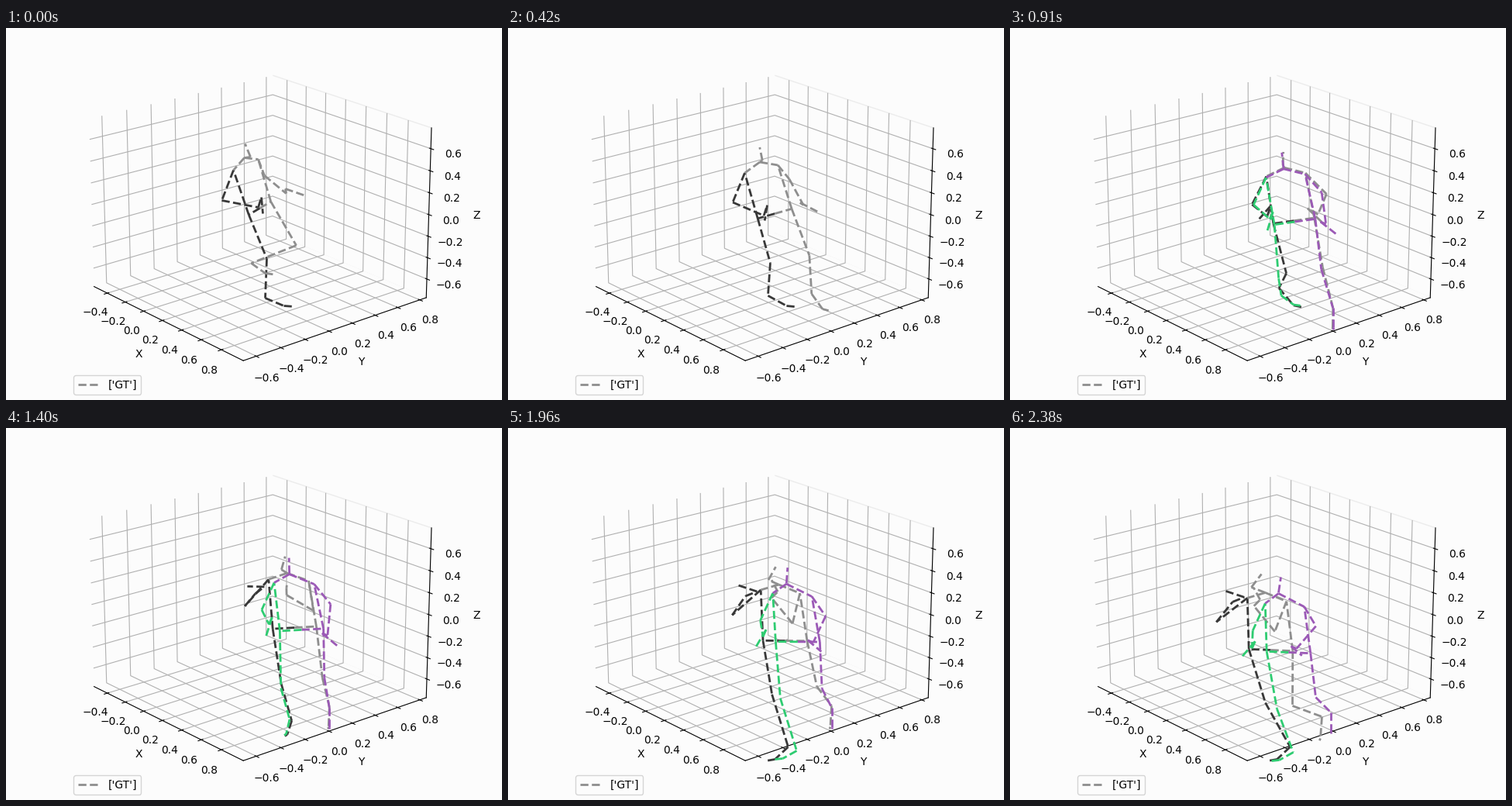
A matplotlib script that plays this animation: 640 by 480 pixels, repeating every 2450 ms.

```python
import numpy as np
import matplotlib.pyplot as plt
from matplotlib.animation import FuncAnimation
from matplotlib.lines import Line2D

W, H, DPI = 640, 480, 100
FRAMES, STEP = 35, 70
PRED_START = 10
TILT = np.sin(np.radians(20))  # foreshortening of level bars
BG = "#fcfcfc"
TRUE_COLORS = {"L": "#8e8e8e", "R": "#383838"}
PRED_COLORS = {"L": "#9b59b6", "R": "#2ecc71"}


def path(*keys):
    """Smooth motion through (time, x, y) keys without overshoot; holds at the ends."""
    keys = np.array(keys, float)
    time, points = keys[:, 0], keys[:, 1:]
    if len(keys) == 1:
        return lambda t: points[0]
    slope = np.diff(points, axis=0) / np.diff(time)[:, None]
    a, b = slope[:-1], slope[1:]
    same = a * b > 0
    mean = np.where(same, 2 * a * b / np.where(same, a + b, 1), 0)
    speed = np.vstack([slope[:1], mean, slope[-1:]])

    def at(t):
        t = np.clip(t, time[0], time[-1])
        i = min(np.searchsorted(time, t, "right"), len(time) - 1) - 1
        span = time[i + 1] - time[i]
        s = (t - time[i]) / span
        ease = s * s * (3 - 2 * s)
        return (points[i] * (1 - ease) + points[i + 1] * ease
                + span * s * (1 - s) * ((1 - s) * speed[i] - s * speed[i + 1]))
    return at


def half_bar(width, degrees):
    a = np.radians(degrees)
    return width / 2 * np.array([np.cos(a), -TILT * np.sin(a)])


def arm(t, shoulder, upper, fore, thumb, hand):
    elbow = shoulder + upper(t)
    wrist = elbow + fore(t)
    return [shoulder, elbow, wrist, wrist + thumb(t), wrist + hand(t)]


def leg(t, hip, knee, ankle, sole):
    step = sole(t)
    foot = ankle(t) + step
    return [hip, knee(t), ankle(t), foot, foot + step * (0.55, 0.1)]


def pose(body, t):
    """Joints of a body that turns as it walks; the trunk hangs on the root."""
    root = body["root"](t)
    chest = root + body["chest"](t)
    neck = chest + body["neck"](t)
    nose = neck + body["nose"](t)
    hip = half_bar(57, 85 * np.exp(-t / 22) - 25)
    shoulder = half_bar(52, max(52 - 2.9 * t, -14))
    return np.array([nose + body["head"](t), nose, neck]
                    + arm(t, chest + shoulder, *body["left_arm"])
                    + leg(t, root + hip, *body["left_leg"])
                    + arm(t, chest - shoulder, *body["right_arm"])
                    + leg(t, root - hip, *body["right_leg"])
                    + [root])


# Arms: upper, fore, thumb and hand vectors.
# Legs: knee and ankle places, sole vector.
true_body = dict(
    root=path((0, 327, 232), (10, 355, 244), (15, 370, 251),
              (22, 372, 260), (28, 357, 274), (34, 336, 286)),
    chest=path((0, -18, -56), (4, -18, -57), (15, -9, -60), (34, -5, -65)),
    neck=path((0, -2, -9)),
    nose=path((0, 8, -1), (34, -18, -7)),
    head=path((0, -7, -17), (34, 13, -17)),
    left_arm=(path((0, 8, 21), (10, 20, 17), (15, 30, 34), (22, -2, 39), (34, -15, 39)),
              path((0, 28, 23), (10, 9, 37), (15, -23, 15), (22, -36, -28), (28, -27, -33)),
              path((0, -1, -6), (10, -7, -2), (15, -16, -11), (22, 8, -8)),
              path((0, 25, 3), (10, 14, 11), (15, 1, 8), (22, 0, -23))),
    left_leg=(path((0, 374, 280), (15, 405, 312), (22, 408, 325),
                   (28, 398, 333), (34, 364, 358)),
              path((0, 316, 303), (4, 371, 329), (10, 416, 361),
                   (28, 417, 358), (34, 402, 372)),
              path((0, 18, 13), (4, 19, 17), (10, 0, 24), (34, -2, 28))),
    right_arm=(path((0, -15, 39), (10, -16, 37), (22, -33, 34), (34, -40, 31)),
               path((0, 47, 9), (10, 34, 20), (15, 13, 10), (22, 14, -22), (34, 21, -26)),
               path((0, 4, -13), (15, 5, -14), (22, 15, -6)),
               path((0, 6, 8), (10, -3, 5), (15, -13, 1), (22, -9, -14))),
    right_leg=(path((0, 336, 297), (4, 336, 300), (15, 358, 320), (34, 329, 354)),
               path((0, 334, 348), (10, 336, 342), (15, 355, 332),
                    (22, 370, 394), (28, 361, 411)),
               path((0, 24, 10), (10, 24, 16), (15, 13, 25), (22, -11, 16), (28, -17, 16))),
)

pred_body = dict(
    root=path((10, 355, 244), (15, 373, 253), (22, 382, 263), (34, 359, 289)),
    chest=path((10, -13, -59), (34, -5, -61)),
    neck=path((10, -2, -9), (15, -3, -9), (22, -7, -13), (34, -8, -15)),
    nose=path((10, 0, -1)),
    head=path((10, -3, -20), (34, 3, -20)),
    left_arm=(path((10, 20, 17), (15, 22, 26), (34, 15, 25)),
              path((10, 9, 37), (15, 3, 42), (34, -25, 29)),
              path((10, -7, -3)),
              path((10, 14, 11), (15, 16, 16), (34, 7, 9))),
    left_leg=(path((10, 397, 306), (22, 411, 325), (34, 394, 347)),
              path((10, 416, 361), (28, 417, 360), (34, 413, 366)),
              path((10, 0, 25))),
    right_arm=(path((10, -16, 35)),
               path((10, 34, 20), (15, 15, 18), (34, -1, 23)),
               path((10, 4, -9)),
               path((10, -3, 5), (15, -3, 18), (34, -14, 12))),
    right_leg=(path((10, 341, 303), (15, 349, 331), (22, 355, 337), (34, 344, 362)),
               path((10, 333, 340), (15, 357, 349), (28, 372, 416), (34, 365, 418)),
               path((10, 25, 17), (15, 10, 10), (22, -9, 21), (28, -18, 10))),
)


def chain(first, side):
    return [(j, j + 1, side) for j in range(first, first + 4)]


BONES = (chain(18, "R") + chain(8, "L")
         + [(23, 18, "R"), (23, 8, "L"), (8, 3, "L")] + chain(3, "L")
         + [(18, 13, "R")] + chain(13, "R")
         + [(2, 13, "L"), (2, 3, "L"), (2, 1, "L"), (1, 0, "L")])

fig = plt.figure(figsize=(W / DPI, H / DPI), dpi=DPI, facecolor=BG)

box = fig.add_axes([0, 0, 1, 1], projection="3d", facecolor=BG)
box.view_init(elev=20, azim=-40)
reach = 0.75 * 25 / 24
for name, center in (("x", 0.231), ("y", 0.0785), ("z", 0.005)):
    box.set(**{name + "lim": (center - reach, center + reach),
               name + "label": name.upper()})
box.set_xticks(np.arange(-2, 5) / 5)
box.set_yticks(np.arange(-3, 5) / 5)
box.set_zticks(np.arange(-3, 4) / 5)
for axis, edge in ((box.xaxis, BG), (box.yaxis, "#ececec"), (box.zaxis, BG)):
    axis.pane.set(facecolor=BG, edgecolor=edge, alpha=1)
key = Line2D([], [], color=TRUE_COLORS["L"], lw=2, ls="--", label="['GT']")
box.legend(handles=[key], loc="lower left", facecolor=BG)

stage = fig.add_axes([0, 0, 1, 1])
stage.set(xlim=(-0.5, W - 0.5), ylim=(H - 0.5, -0.5))
stage.axis("off")


def make_lines(colors):
    return [stage.plot([], [], "--", lw=2, color=colors[side])[0]
            for _, _, side in BONES]


def place(lines, joints):
    for line, (a, b, _) in zip(lines, BONES):
        line.set_data(joints[[a, b], 0], joints[[a, b], 1])


true_lines, pred_lines = make_lines(TRUE_COLORS), make_lines(PRED_COLORS)


def draw(n):
    place(true_lines, pose(true_body, n))
    place(pred_lines, pose(pred_body, n))
    for line in pred_lines:
        line.set_visible(n >= PRED_START)
    return true_lines + pred_lines


anim = FuncAnimation(fig, draw, frames=FRAMES, interval=STEP,
                     repeat=True, repeat_delay=0, blit=False)
plt.show()
```
